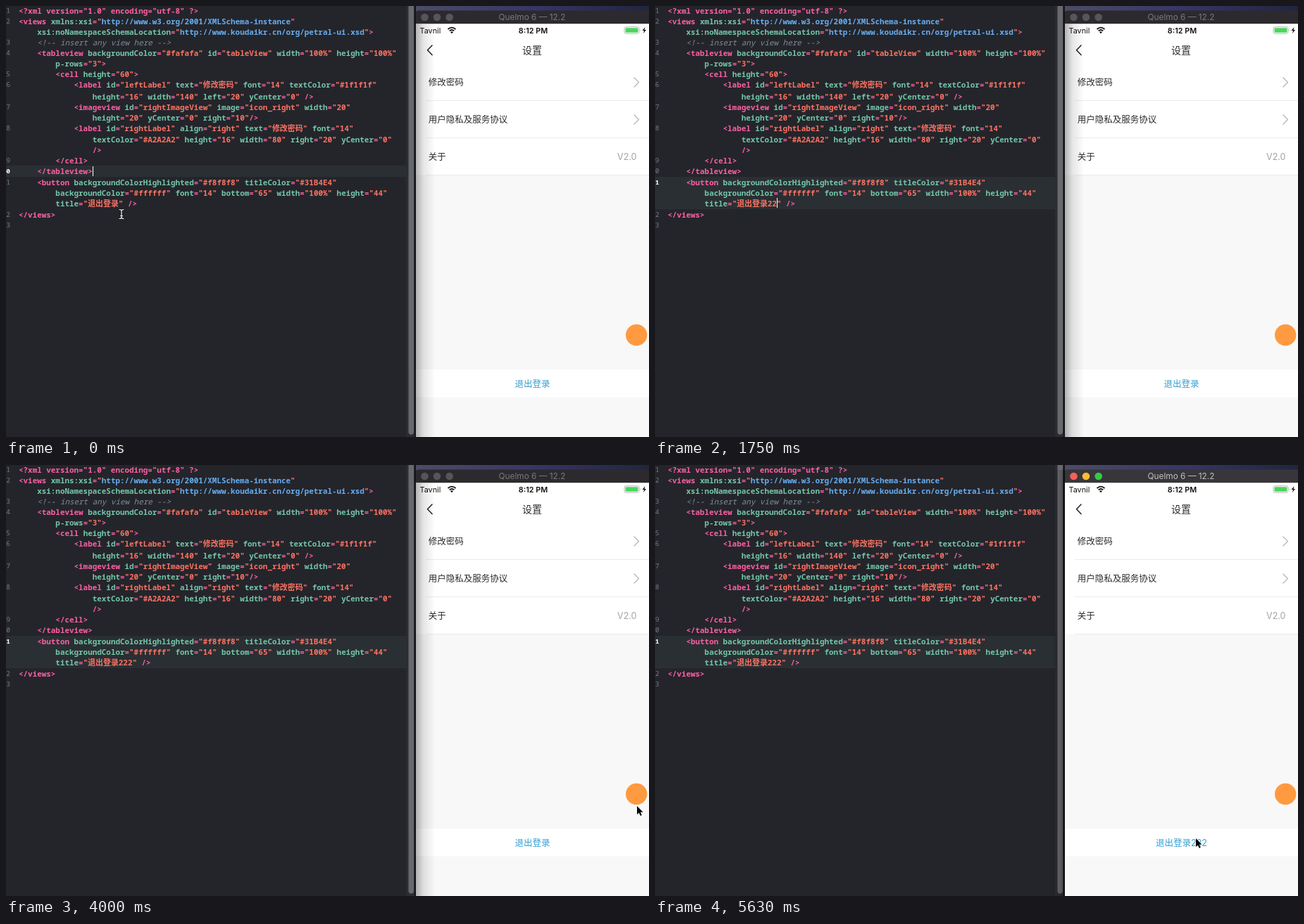
These frames come from a looping animation (913x613 px, 5.76 s). An HTML page:

```html
<!DOCTYPE html>
<html lang="zh">
<head>
<meta charset="utf-8">
<title>设置</title>
<style>
  html, body { margin: 0; width: 100%; height: 100%; overflow: hidden; background: #24252b; }
  #stage { position: relative; width: 913px; height: 613px; overflow: hidden; }
  #stage, #stage *, #stage *::before, #stage *::after {
    animation-duration: 5760ms;
    animation-iteration-count: infinite;
    animation-timing-function: step-end;
  }

  /* Editor */
  #code {
    position: absolute; left: 0; top: -1px; width: 568px;
    font: 600 10.92px/15.05px "Noto Sans Mono", "Noto Sans CJK SC", "Noto Sans CJK", monospace;
    color: #fc5fa3; white-space: pre;
  }
  .block { position: relative; }
  .row { height: 15.05px; padding-left: 18px; }
  .row.cjk { padding-bottom: 1.4px; }
  .num {
    position: absolute; right: 562px; top: 0;
    font-size: 9.6px; font-weight: 500; color: #747980;
  }
  .tag { font-weight: 700; color: #fc5fa3; }
  .attr { color: #74c6a9; }
  .str { color: #fd7262; }
  .url { color: #66adf0; }
  .note { color: #7f8c98; font-weight: 500; font-style: italic; }
  .caret::after {
    content: ""; position: absolute; width: 1.4px; height: 14px;
    margin-top: .5px; background: #fff;
  }
  #line10 { animation-name: leave-line; }
  #line11 { animation-name: enter-line; }
  #line10 .num { animation-name: leave-num; }
  #line11 .num { animation-name: enter-num; }
  #line10 .caret::after { animation-name: first-caret; }
  .typed::before { content: ""; animation-name: typing; }
  .typed::after { animation-name: typing-caret; }

  @keyframes leave-line { 0% { background: #2a2f33; } 8.68%, 100% { background: transparent; } }
  @keyframes enter-line { 0% { background: transparent; } 8.68%, 100% { background: #2a2f33; } }
  @keyframes leave-num { 0% { color: #fff; font-weight: 700; } 8.68%, 100% { color: #747980; font-weight: 500; } }
  @keyframes enter-num { 0% { color: #747980; font-weight: 500; } 8.68%, 100% { color: #fff; font-weight: 700; } }
  @keyframes first-caret { 0% { opacity: 1; } 8.68%, 100% { opacity: 0; } }
  @keyframes typing {
    0% { content: ""; }
    21.7% { content: "2"; }
    26.04% { content: "22"; }
    34.72%, 100% { content: "222"; }
  }
  @keyframes typing-caret {
    0% { opacity: 0; }
    8.68% { opacity: 1; }
    43.4% { opacity: 0; }
    54.3% { opacity: 1; }
    62.9% { opacity: 0; }
    71.6% { opacity: 1; }
    78.1%, 100% { opacity: 0; }
  }

  /* Phone window */
  svg { position: absolute; left: 0; top: 0; }
  svg text { font-family: Inter, "Noto Sans CJK SC", "Noto Sans CJK", sans-serif; font-size: 12.5px; fill: #2a2a2a; }
  .mid { text-anchor: middle; }
  svg .small { font-size: 10.8px; fill: #111; }
  svg .heading { font-size: 14px; }
  svg .version { text-anchor: end; fill: #a2a2a2; }
  svg .button { fill: #319fd3; }
  .line { fill: none; stroke-linecap: round; stroke-linejoin: round; }
  #phoneBehind { animation-name: hide-on-focus; }
  #phoneInFront { animation-name: show-on-focus; }
  #bar { animation-name: bar; }
  svg #caption { font-size: 11.8px; animation-name: caption; }
  .light { animation-name: light; }
  #label { animation-name: label-before; }
  #newLabel { animation-name: label-after; }

  @keyframes hide-on-focus { 0% { opacity: 1; } 78.1%, 100% { opacity: 0; } }
  @keyframes show-on-focus { 0% { opacity: 0; } 78.1%, 100% { opacity: 1; } }
  @keyframes bar { 0% { fill: #2c2a2e; } 78.1%, 100% { fill: #38363a; } }
  @keyframes caption { 0% { fill: #7b797c; } 78.1%, 100% { fill: #c2c0c3; } }
  @keyframes light { 0% { fill: #575559; } 78.1%, 100% { fill: var(--lit); } }
  @keyframes label-before { 0% { opacity: 1; } 80.2%, 100% { opacity: 0; } }
  @keyframes label-after { 0% { opacity: 0; } 80.2%, 100% { opacity: 1; } }

  /* Pointers */
  #ibeam { animation-name: ibeam; }
  #arrow { animation-name: arrow; }
  @keyframes ibeam {
    0% { transform: translate(164px, 296px); opacity: 1; }
    4.34% { transform: translate(163px, 293px); opacity: 1; }
    6.51% { transform: translate(160px, 288px); opacity: 1; }
    21.7% { transform: translate(160px, 288px); opacity: 0; }
    56.42% { transform: translate(175px, 292px); opacity: 1; }
    58.59% { transform: translate(330px, 335px); opacity: 1; }
    60.76% { transform: translate(500px, 382px); opacity: 1; }
    62.9%, 100% { transform: translate(560px, 400px); opacity: 0; }
  }
  @keyframes arrow {
    0% { transform: translate(680px, 430px); opacity: 0; }
    62.9% { transform: translate(680px, 430px); opacity: 1; }
    65.1% { transform: translate(820px, 470px); opacity: 1; }
    67.27% { transform: translate(896px, 485px); opacity: 1; }
    73.78% { transform: translate(896px, 480px); opacity: 1; }
    75.95% { transform: translate(895px, 474px); opacity: 1; }
    86.8% { transform: translate(885px, 492px); opacity: 1; }
    88.97% { transform: translate(860px, 520px); opacity: 1; }
    91.14% { transform: translate(825px, 545px); opacity: 1; }
    93.31% { transform: translate(795px, 553px); opacity: 1; }
    95.48% { transform: translate(778px, 551px); opacity: 1; }
    97.65%, 100% { transform: translate(768px, 531px); opacity: 1; }
  }
</style>
</head>
<body>
<div id="stage">
  <div id="code"></div>
  <svg width="913" height="613" viewBox="0 0 913 613">
    <defs>
      <linearGradient id="desk">
        <stop offset="0" stop-color="#4d4b66"/>
        <stop offset=".5" stop-color="#363764"/>
        <stop offset="1" stop-color="#20253f"/>
      </linearGradient>
      <linearGradient id="fade">
        <stop offset="0" stop-opacity=".3"/>
        <stop offset=".4" stop-opacity=".1"/>
        <stop offset="1" stop-opacity="0"/>
      </linearGradient>
    </defs>

    <rect x="568" width="14" height="613" fill="#2b2c31"/>
    <rect x="571.5" y="-8" width="7.5" height="617.5" rx="3.7" fill="#68696d"/>
    <rect x="580" width="2" height="613" fill="#141418"/>
    <rect id="phoneInFront" x="-582" y="7" width="20" height="606" transform="scale(-1 1)" fill="url(#fade)"/>

    <rect x="582" width="331" height="8" fill="url(#desk)"/>
    <path id="bar" d="M582 26V10q0-3.5 3.5-3.5H913V26z"/>
    <circle class="light" style="--lit:#f4605a" cx="594.5" cy="16" r="5.3"/>
    <circle class="light" style="--lit:#f8bc36" cx="612" cy="16" r="5.3"/>
    <circle class="light" style="--lit:#36c84b" cx="629.7" cy="16" r="5.3"/>
    <text id="caption" class="mid" x="747" y="20.2">Quelmo 6 — 12.2</text>

    <rect x="582" y="25.5" width="331" height="588" fill="#f8f8f8"/>
    <rect x="582" y="25.5" width="331" height="215" fill="#fff"/>
    <text class="small" x="587.5" y="38.5">Tavnil</text>
    <path class="line" d="M627.5 33q5.5-4.8 11 0M629.7 35.4q3.3-2.9 6.6 0" stroke="#111" stroke-width="1.8" style="stroke-linecap:butt"/>
    <path d="M631 37q2-1.5 4 0l-2 2.2z" fill="#111"/>
    <text class="small mid" x="748.5" y="38.5" font-weight="600">8:12 PM</text>
    <rect x="878" y="29.7" width="21" height="9.6" rx="2.5" fill="none" stroke="#a5a5a5" stroke-width=".8"/>
    <rect x="879.5" y="31.2" width="18" height="6.6" rx="1.3" fill="#4cd55e"/>
    <path d="M900.2 33q1.5 1.5 0 3z" fill="#a5a5a5"/>
    <path d="M907.5 30l-4 5h2.5l-1 4 4-5h-2.5z" fill="#111"/>
    <path class="line" d="M605 56l-6.5 6.8 6.5 6.8" stroke="#222" stroke-width="1.5"/>
    <text class="heading mid" x="747" y="68.2">设置</text>

    <path d="M596 134.5H913M596 187.5H913M596 240.5H913" stroke="#ececec"/>
    <text x="599.7" y="112.8">修改密码</text>
    <text x="599.7" y="165.8">用户隐私及服务协议</text>
    <text x="599.7" y="218.8">关于</text>
    <text class="version" x="895.5" y="218.7">V2.0</text>
    <path class="line" d="M892 102l6.5 6.5-6.5 6.5M892 155l6.5 6.5-6.5 6.5" stroke="#b5b5b5" stroke-width="1.3"/>

    <rect x="582" y="517" width="331" height="39.5" fill="#fff"/>
    <text id="label" class="button mid" x="747.5" y="542">退出登录</text>
    <text id="newLabel" class="button mid" x="747.5" y="542">退出登录222</text>
    <circle cx="895.2" cy="468" r="15.2" fill="#ff9a40"/>
    <rect id="phoneBehind" x="582" y="25.5" width="27" height="588" fill="url(#fade)"/>

    <g id="ibeam" class="line">
      <path d="M-3-6.5Q0-6.5 0-4.5V4.5Q0 6.5-3 6.5M3-6.5Q0-6.5 0-4.5M0 4.5Q0 6.5 3 6.5M-1.5 2.5h3" stroke="#111" stroke-width="2.6"/>
      <path d="M-3-6.5Q0-6.5 0-4.5V4.5Q0 6.5-3 6.5M3-6.5Q0-6.5 0-4.5M0 4.5Q0 6.5 3 6.5M-1.5 2.5h3" stroke="#fff" stroke-width="1.2"/>
    </g>
    <path id="arrow" d="M0 0V12l2.8-2.6 2 4.6 2-.9-2-4.4H8.5z" fill="#000" stroke="#fff" stroke-width=".9" paint-order="stroke"/>
  </svg>
</div>
<script>
  const source = String.raw`<?xml version="1.0" encoding="utf-8" ?>
<views xmlns:xsi="http:~~www.w3.org/2001/XMLSchema-instance"
+    xsi:noNamespaceSchemaLocation="http:~~www.koudaikr.cn/org/petral-ui.xsd">
    <!-- insert any view here -->
    <tableview backgroundColor="#fafafa" id="tableView" width="100%" height="100%"
+        p-rows="3">
        <cell height="60">
            <label id="leftLabel" text="修改密码" font="14" textColor="#1f1f1f"
+                height="16" width="140" left="20" yCenter="0" />
            <imageview id="rightImageView" image="icon_right" width="20"
+                height="20" yCenter="0" right="10"/>
            <label id="rightLabel" align="right" text="修改密码" font="14"
+                textColor="#A2A2A2" height="16" width="80" right="20" yCenter="0"
+                />
        </cell>
    </tableview>
    <button backgroundColorHighlighted="#f8f8f8" titleColor="#31B4E4"
+        backgroundColor="#ffffff" font="14" bottom="65" width="100%" height="44"
+        title="退出登录" />
</views>
`;

  const escapeHtml = s => s.replace(/&/g, "&amp;").replace(/</g, "&lt;").replace(/>/g, "&gt;");
  const span = (kind, s) => `<span class="${kind}">${escapeHtml(s)}</span>`;

  function paintToken(token) {
    if (token.startsWith('"http')) {
      return span("str", '"') + span("url", token.slice(1, -1).replace("~~", "//")) + span("str", '"');
    }
    if (token[0] === '"') return span("str", token);
    return span(/^\w/.test(token) ? "attr" : "tag", token);
  }

  function paintRow(row) {
    if (row.startsWith("<?")) return span("tag", row);
    if (row.includes("<!--")) return span("note", row);
    return row
      .replace(/"[^"]*"|<\/?\w+|\/?>|[\w:-]+(?==)|=/g, paintToken)
      .replace("退出登录", '退出登录<span class="typed caret"></span>')
      .replace(/(&lt;\/tableview.*)$/, '$1<span class="caret"></span>');
  }

  // A leading "+" marks the wrapped part of a long line.
  document.getElementById("code").innerHTML = source.split(/\n(?!\+)/).map((line, i) => {
    const rows = line.split("\n+").map(row =>
      `<div class="row${/[一-龥]/.test(row) ? " cjk" : ""}">${paintRow(row)}</div>`);
    return `<div class="block" id="line${i + 1}"><span class="num">${i + 1}</span>${rows.join("")}</div>`;
  }).join("");
</script>
</body>
</html>
```
